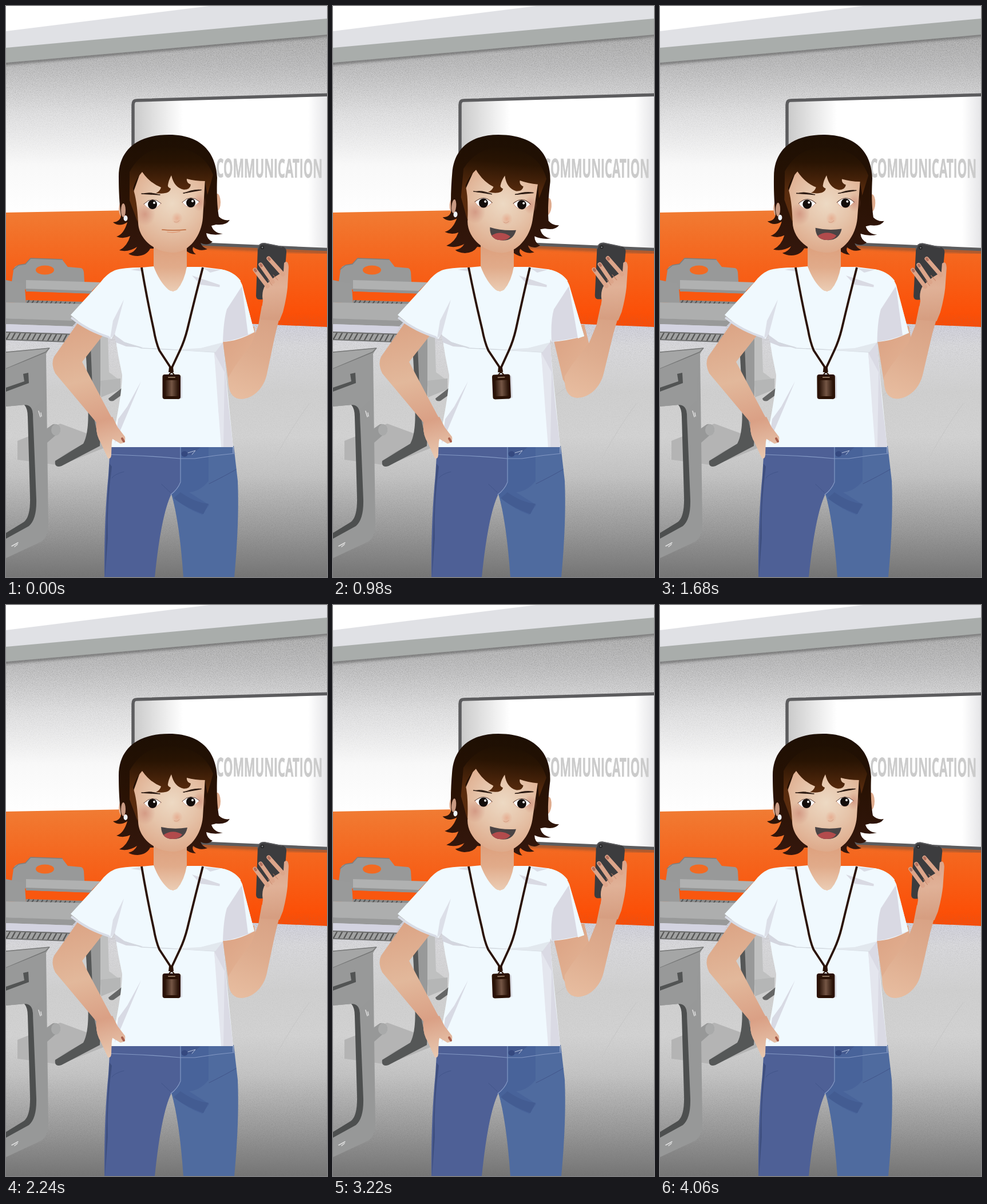
These frames come from a looping animation (561 px wide and 998 px high, 4.2 s). An HTML page:

```html
<!DOCTYPE html>
<html lang="en">
<head>
<meta charset="utf-8">
<title>Classroom</title>
<style>
html, body { margin: 0; width: 100%; height: 100%; overflow: hidden; background: #fff; }
svg { position: absolute; left: 0; top: 0; width: 561px; height: 998px; }
#room { will-change: transform; }
</style>
</head>
<body>
<svg id="room" viewBox="0 0 561 998">
  <defs>
    <linearGradient id="wall" x2="0" y2="1">
      <stop offset="0" stop-color="#b2b2b2"/><stop offset=".2" stop-color="#c2c2c3"/>
      <stop offset=".45" stop-color="#e2e2e3"/><stop offset=".72" stop-color="#f8f8f8"/><stop offset="1" stop-color="#fff"/>
    </linearGradient>
    <linearGradient id="orange" x2="0" y2="1">
      <stop offset="0" stop-color="#f07d35"/><stop offset=".45" stop-color="#f5651d"/><stop offset="1" stop-color="#fd4a02"/>
    </linearGradient>
    <linearGradient id="floor" x2="0" y2="1">
      <stop offset="0" stop-color="#d0d0df"/><stop offset=".13" stop-color="#dadadd"/><stop offset=".3" stop-color="#d0d0d0"/>
      <stop offset=".47" stop-color="#d3d3d3"/><stop offset=".62" stop-color="#c4c4c4"/><stop offset=".82" stop-color="#9c9c9c"/><stop offset="1" stop-color="#747474"/>
    </linearGradient>
    <linearGradient id="board">
      <stop offset="0" stop-color="#c9c9c9"/><stop offset=".1" stop-color="#dfdfdf"/><stop offset=".25" stop-color="#fff"/>
      <stop offset=".88" stop-color="#fff"/><stop offset="1" stop-color="#dedee1"/>
    </linearGradient>
    <linearGradient id="fade" x2="0" y2="1">
      <stop offset="0" stop-color="#fff"/><stop offset=".14" stop-color="#555"/><stop offset=".24" stop-color="#000"/>
      <stop offset=".51" stop-color="#000"/><stop offset=".53" stop-color="#888"/><stop offset=".63" stop-color="#222"/>
      <stop offset=".8" stop-color="#333"/><stop offset="1" stop-color="#fff"/>
    </linearGradient>
    <mask id="grainMask"><rect y="55" width="561" height="943" fill="url(#fade)"/></mask>
    <filter id="grain" x="0" y="0" width="1" height="1">
      <feTurbulence type="fractalNoise" baseFrequency=".8" numOctaves="2" seed="4"/>
      <feColorMatrix values="0 0 0 0 .2  0 0 0 0 .2  0 0 0 0 .2  1.5 0 0 0 -.63"/>
    </filter>
    <filter id="soft"><feGaussianBlur stdDeviation="2.5"/></filter>
  </defs>
  <path d="M0 90L561 40V360L0 368Z" fill="url(#wall)"/>
  <path d="M0 535L561 560V998H0Z" fill="url(#floor)"/>
  <path d="M0 361L220 357L561 350V561L440 556L0 537Z" fill="url(#orange)"/>
  <g mask="url(#grainMask)"><rect y="55" width="561" height="943" filter="url(#grain)"/></g>
  <path d="M-9 101L570 50" stroke="#444" stroke-width="4" filter="url(#soft)" opacity=".8"/>
  <path d="M0 0H561V50L0 99Z" fill="#a9adab"/>
  <path d="M0 0H561V22L0 73Z" fill="#e0e1e5"/>
  <path d="M0 0H355L0 44Z" fill="#fff"/>
  <path d="M226 415L575 431" stroke="#444" stroke-width="5" filter="url(#soft)" opacity=".6"/>
  <path d="M228 165L570 155V426L228 411Q222 411 222 404V173Q222 165 228 165Z" fill="url(#board)" stroke="#5c5c5e" stroke-width="5.5"/>
  <text transform="matrix(.46 .002 0 1 553 300)" font-family="'Open Sans','Noto Sans',sans-serif" font-weight="700" font-size="45" text-anchor="end" fill="#cbcbcb" stroke="#cbcbcb" stroke-width=".8">COMMUNICATION</text>
  <g id="desks"></g>
</svg>
<svg id="person" viewBox="0 0 561 998">
  <defs>
    <linearGradient id="hair" gradientUnits="userSpaceOnUse" x1="285" y1="225" x2="285" y2="436">
      <stop offset="0" stop-color="#1d0f03"/><stop offset=".5" stop-color="#291204"/><stop offset="1" stop-color="#34170d"/>
    </linearGradient>
    <linearGradient id="fringe" gradientUnits="userSpaceOnUse" x1="285" y1="245" x2="285" y2="326">
      <stop offset="0" stop-color="#1f1003"/><stop offset=".35" stop-color="#291403"/><stop offset="1" stop-color="#5a2c0e"/>
    </linearGradient>
    <radialGradient id="face" gradientUnits="userSpaceOnUse" cx="290" cy="345" r="92">
      <stop offset="0" stop-color="#edd9c3"/><stop offset=".45" stop-color="#e6c5ab"/><stop offset="1" stop-color="#dda686"/>
    </radialGradient>
    <linearGradient id="neck" x2="0" y2="1">
      <stop offset="0" stop-color="#dd9f7c"/><stop offset=".5" stop-color="#e1ab8a"/><stop offset="1" stop-color="#ebcdb5"/>
    </linearGradient>
    <linearGradient id="leftArm" gradientUnits="userSpaceOnUse" x1="120" y1="560" x2="180" y2="790">
      <stop offset="0" stop-color="#dca586"/><stop offset=".4" stop-color="#e2b89b"/><stop offset=".72" stop-color="#daa085"/><stop offset="1" stop-color="#e8c8b0"/>
    </linearGradient>
    <linearGradient id="upper" gradientUnits="userSpaceOnUse" x1="380" y1="590" x2="440" y2="660">
      <stop offset="0" stop-color="#dda586"/><stop offset="1" stop-color="#e3b698"/>
    </linearGradient>
    <linearGradient id="fore" gradientUnits="userSpaceOnUse" x1="470" y1="520" x2="415" y2="685">
      <stop offset="0" stop-color="#d69e81"/><stop offset=".55" stop-color="#deac8e"/><stop offset="1" stop-color="#e7bc9f"/>
    </linearGradient>
    <linearGradient id="palm" gradientUnits="userSpaceOnUse" x1="460" y1="440" x2="470" y2="545">
      <stop offset="0" stop-color="#dba085"/><stop offset=".5" stop-color="#e0b197"/><stop offset="1" stop-color="#d69e81"/>
    </linearGradient>
    <radialGradient id="blush"><stop offset="0" stop-color="#c98270" stop-opacity=".6"/><stop offset="1" stop-color="#c98270" stop-opacity="0"/></radialGradient>
    <radialGradient id="glow"><stop offset="0" stop-color="#e59a7c" stop-opacity=".6"/><stop offset="1" stop-color="#e59a7c" stop-opacity="0"/></radialGradient>
    <linearGradient id="badgeFill"><stop offset="0" stop-color="#2b150a"/><stop offset=".5" stop-color="#755645"/><stop offset="1" stop-color="#2b150a"/></linearGradient>
  </defs>
  <g id="backHair"></g>
  <g id="upperArm"></g>
  <g id="foreArm"><g id="limb"></g><g id="hand"></g></g>
  <g id="body"></g>
  <g id="sleeve"></g>
  <path id="strap" fill="none" stroke="#2a1206" stroke-width="3.8" stroke-linejoin="round"/>
  <g id="badge"></g>
  <path d="M258 415V455Q268 482 284 496Q291 501 299 496Q312 481 316 455V415Z" fill="url(#neck)"/>
  <g id="head"></g>
</svg>
<script>
const $ = id => document.getElementById(id);
const shape = (d, fill) => `<path d="${d}" fill="${fill}"/>`;
const line = (d, color, w = 1) => `<path d="${d}" fill="none" stroke="${color}" stroke-width="${w}" stroke-linecap="round" stroke-linejoin="round"/>`;
const oval = (x, y, rx, ry, fill) => `<ellipse cx="${x}" cy="${y}" rx="${rx}" ry="${ry}" fill="${fill}"/>`;
const fill = (id, ...parts) => $(id).innerHTML = parts.join('');
const slats = (x, y, n, gap, dx, dy) => Array.from({ length: n }, (_, i) =>
  line(`M${x + i * gap} ${y + i * .35}l${dx} ${dy}`, '#555', 2.2)).join('');

fill('desks',
  // back row
  shape('M10 482L13 462Q14 454 22 453L34 451L43 441L98 443L108 456L131 458Q135 459 136 465L138 498L35 496Z', '#989999'),
  line('M12 461L22 453L34 451L43 441L98 443', '#7d7e7e', 1.5),
  oval(68, 461.5, 16, 8, '#f26a22'),
  shape('M35 479L165 483L148 500L35 496Z', '#b0b1b1'),
  shape('M35 494L150 498V503L35 499Z', '#929393'),
  shape('M35 499L148 503L140 518L35 514Z', '#f9570f'),
  shape('M35 514L135 517L128 524L35 520Z', '#8a8b8b'),
  slats(40, 515, 11, 8, -4, 6),
  shape('M0 479L28 485Q33 486 33 492L35 520L0 518Z', '#999a9a'),
  // middle row
  shape('M165 570L178 575L180 640L200 655V662L165 664Z', '#bfc0c0'),
  shape('M165 655L200 651V670L166 684Z', '#b5b6b6'),
  shape('M179 686L202 668V680L188 690Q180 692 179 686Z', '#656666'),
  shape('M20 760L95 730L190 765L95 803L20 793Z', '#b4b4b4'),
  shape('M0 518L146 521L115 551L0 546Z', '#adaeae'),
  shape('M0 546L115 550L146 521V528L116 560L0 556Z', '#989999'),
  shape('M0 556L116 560L110 574L0 569Z', '#d3d3e0'),
  shape('M0 569L118 573L108 586L0 583Z', '#a1a2a2'),
  slats(7, 571, 12, 9, -6, 11),
  line('M0 570L118 574M0 583L108 587', '#6e6f6f', 2),
  shape('M140 600L165 572L165 752L100 785L92 789L140 763Q151 740 149 690Z', '#989999'),
  shape('M138 600L148 595L152 690Q153 738 165 752L164 769L97 804Q84 808 86 795L135 765Q146 745 143 695Z', '#555757'),
  shape('M92 610L139 595L145 705L90 650Z', '#cfd0d0'),
  shape('M45 757L82 731Q95 729 95 743L70 765L45 785Z', '#979898'),
  oval(87, 741, 8, 10, '#a9aaaa'),
  // front desk
  shape('M0 605L76 598L70 608L74 905Q74 930 60 937L0 965V930L40 907Q52 896 51 862L47 714Q46 698 33 697L0 700Z', '#979898'),
  shape('M0 605L76 598L69 605L0 634Z', '#a5a6a6'),
  line('M0 634L69 605L76 598L0 605', '#757676', 1.4),
  shape('M0 634L68 607L64 690L48 705L34 697L0 700Z', '#989999'),
  shape('M30 643L39 641L40 659L0 674V667L32 656Z', '#525454'),
  shape('M32 697Q46 697 47 713L53 862Q54 897 40 909L0 931V921L31 902Q43 893 42 858L38 718Q38 704 32 697Z', '#4d4f4f'),
  line('M57 708l3 10M61 711l1 6M10 944l11-6M15 945l5-4', '#e0e0e0', 1.5),
  line('M470 790Q500 735 530 695M390 680L410 665', '#c5c5c5', 1)
);

const outline = 'M197 300C196 250 232 225 285 225C333 225 366 248 369 300C368 330 369 350 372 368Q380 376 391 374Q385 384 367 382Q359 384 359 384C362 394 371 398 379 398Q365 402 350 397Q351 408 361 412Q352 420 340 414Q343 422 352 425Q338 430 327 421Q324 428 332 434Q320 434 310 424L252 424Q246 436 230 437Q220 437 214 433Q225 430 229 421Q214 431 198 427Q212 420 217 402Q205 408 193 403Q206 399 212 378Q198 387 187 378Q200 377 201 366C198 345 197 320 197 300Z';
fill('backHair',
  oval(205, 355, 8, 15, '#dfae94'), oval(369, 343, 6, 15, '#dfab8d'),
  shape(outline, 'url(#hair)'),
  oval(205, 357, 4, 12, '#c99a83'), oval(209, 371, 3.5, 5, '#eef3fa'));

fill('upperArm', shape('M378 560L379 588L388 652Q400 684 432 666L440 600L434 560Z', 'url(#upper)'));
fill('limb', shape('M447 524L441 558L429 590L400 630L388 650C388 672 394 687 412 687C432 686 451 668 456 643L471 572L482 530Z', 'url(#fore)'));
const finger = (a, b) => line(`M${a}L${b}`, '#dca58a', 7.2) + line(`M${a}l1.5 2`, '#b3705e', 4.5);
fill('hand',
  shape('M440 423Q442 413 452 414L482 420Q491 422 490 431L484 505Q483 512 475 512L443 513Q437 513 437 506Z', '#3c3c3e'),
  line('M440 425Q442 415 451 415L482 421', '#5d5d60', 1.5),
  oval(448, 422, 3, 3, '#222'), oval(448, 422, 1.4, 1.4, '#76777c'),
  shape('M453 488L469 474L485 464L486 449Q493 443 494 456L492 492Q490 512 484 535L478 550L444 548L449 515Q446 500 453 488Z', 'url(#palm)'),
  finger('435 461', '457 490'), finger('445 452', '466 482'), finger('459 441', '484 469'),
  line('M458 479L465 488M467 470L475 479', '#c78468', 1));

fill('body',
  // resting arm
  shape('M126 553L84 613Q78 625 86 642L158 728Q156 748 166 764L178 790Q183 794 183 782L190 740L186 722L133 622L170 575Z', 'url(#leftArm)'),
  // jeans
  shape('M182 769H310L306 840L289 853Q271 890 260 998H172Q171 900 179 820Z', '#4e6096'),
  shape('M304 769H398L405 830Q408 900 399 998H310Q303 900 289 853L304 838Z', '#4f6b9f'),
  shape('M304 771H354V830Q340 848 320 850L355 872L343 889Q318 880 296 862L289 853L304 838Z', '#48639a'),
  shape('M181 800Q175 880 173 998L178 930Q176 870 185 805Z', '#3e4f80'),
  shape('M305 850Q330 868 354 870L345 888Q310 875 293 860Z', '#435c92'),
  shape('M306 771H340L324 785L306 783Z', '#43598f'),
  line('M184 784Q250 786 304 791H330Q365 785 400 782M305 771V832Q300 845 288 854', '#8398c4', 1.2),
  line('M397 771V781M318 781L331 777L325 784', '#b8c5e0', 1),
  line('M185 825Q190 818 206 814M272 836L287 850M355 835Q385 820 402 810', '#42558a', 1),
  oval(312, 783, 5.5, 5, '#354980'),
  // shirt
  shape('M237 457Q205 457 190 462Q176 468 165 483L113 540Q145 568 184 582L190 572L196 610L203 645Q203 680 183 771H397L379 590L385 540L410 480Q398 464 375 460L343 456H316L292 499L258 455Z', '#f0f9fe'),
  shape('M379 588L364 606Q372 690 371 705L380 771H397L388 690Z', '#dadae4'),
  shape('M382 640L364 606L371 705L376 771H380Z', '#e4e6ee'),
  shape('M190 765L236 656L212 700L196 722Z', '#d8dae4'),
  shape('M190 575L208 588L240 597L210 595L192 588Z', '#d4d6df'),
  shape('M187 550L206 513L190 574L182 581Z', '#dcdfe8'),
  shape('M115 543Q145 566 180 577L184 582Q142 570 113 546Z', '#d8dce6'),
  line('M207 588L237 598L300 601L366 605', '#d2d8df', 1.4),
  shape('M285 601L340 598L379 588L366 605Z', '#e2e8ee'),
  shape('M218 461L240 457L238 464Z', '#d9dce5'),
  shape('M345 458L375 461L357 466Z', '#d9dce5'),
  shape('M325 471L393 494L340 487Z', '#d9dae3'),
  // hand on hip
  shape('M158 728L186 718L195 736L208 753Q210 764 200 765L185 756L184 785Q183 793 178 790L166 764Q156 748 158 728Z', 'url(#leftArm)'),
  line('M203 756L206 761', '#a9604c', 4));

fill('badge',
  shape('M282 642L303 645Q308 646 308 651V685L300 688Z', '#d9dce4'),
  shape('M285 631H292L293 640H284Z', '#2a1206'),
  line('M285 645Q289 636 294 645', '#2a1206', 2),
  '<rect x="273.5" y="644" width="31.5" height="43" rx="4" fill="#2a1206"/>',
  '<rect x="278" y="654" width="23" height="28" rx="2" fill="url(#badgeFill)"/>',
  line('M284 649H295', '#8c735f', 2));

const eye = (x, y) =>
  shape(`M${x - 15} ${y}Q${x} ${y - 15} ${x + 15} ${y - 1}Q${x + 6} ${y + 9} ${x} ${y + 9}Q${x - 9} ${y + 9} ${x - 15} ${y}Z`, '#fff') +
  line(`M${x - 15} ${y}Q${x - 9} ${y + 9} ${x} ${y + 9}Q${x + 6} ${y + 9} ${x + 15} ${y - 1}`, '#d9a48e', 1) +
  line(`M${x - 15} ${y}Q${x} ${y - 15} ${x + 15} ${y - 1}`, '#5b3a2e', 1) +
  oval(x, y + 1, 8, 8, '#130d0b') + oval(x + 3, y - 2, 2, 2, '#fff');
fill('head',
  shape('M221 330L237 285H349L344 370C342 400 321 431 292 431C258 431 231 405 231 378Z', 'url(#face)'),
  oval(243, 364, 18, 20, 'url(#blush)'), oval(338, 343, 12, 16, 'url(#blush)'),
  oval(299, 371, 10, 11, 'url(#glow)'),
  line('M294 377Q299 380 303 375', '#d49b80', 1),
  eye(256, 346), eye(323, 343),
  shape('M236 329Q250 323 270 330Q251 328 236 329Z', '#2d1b12'),
  shape('M309 328Q326 319 343 321Q326 324 309 328Z', '#2d1b12'),
  line('M237 328L269 330M310 327L341 321.5', '#2d1b12', 1.4),
  `<g id="closed">${line('M273 391Q292 393 314 391', '#bd6639', 1.7)}${line('M282 395Q293 397 304 394', '#e0936e', 1.2)}</g>`,
  `<g id="open">${shape('M271 388Q293 393 317 389Q313 410 291 409Q272 409 271 388Z', '#4a4445')}${shape('M275 402Q291 391 308 401Q303 409 291 409Q280 409 275 402Z', '#b24b4c')}</g>`,
  shape('M231 380L216 340L216 290Q240 245 290 247Q345 250 362 295L352 330L348 306Q330 306 316 302Q315 309 323 312Q322 321 311 321Q294 318 289 296Q284 305 283 313Q282 317 288 319Q286 330 262 327Q269 324 271 317Q252 310 238 290Q226 303 222 319Q229 338 231 380Z', 'url(#fringe)'));

// step, head tilt, upper arm swing, forearm turn, hand turn, badge offset
const poses = [
  [0, 0, 0, 0, 0, 0], [3, 4.2, 1, .2, -4, 4.5], [5, 5.1, 1, 1.2, -2, 3.4], [8, 5, 1, 2, -1, 4],
  [10, 3.6, .7, 2.5, -1.5, 2], [13, 0, 0, .8, 0, .3], [14, 0, 0, 0, 0, 0], [16, 0, 0, 0, 0, 0],
  [19, 4.4, 1, .2, -4, 4.5], [20, 5.1, 1, 1, -2, 3], [26, 4.8, 1, 2, -1, 4], [29, 0, 0, .8, 0, .3], [30, 0, 0, 0, 0, 0]
];
const quiet = [0, 4, 5, 9, 10, 14, 15, 19, 20, 24, 25];
const STEP = 140, COUNT = 30;

function poseAt(step) {
  const i = poses.findIndex(p => p[0] > step), a = poses[i - 1], b = poses[i];
  const u = (step - a[0]) / (b[0] - a[0]), e = u * u * (3 - 2 * u);
  return a.map((v, j) => v + (b[j] - v) * e);
}

function draw(step) {
  const [, tilt, swing, fore, hand, shift] = poseAt(step);
  const move = (id, t) => $(id).setAttribute('transform', t);
  for (const id of ['head', 'backHair']) move(id, `rotate(${tilt} 288 425)`);
  move('upperArm', `rotate(${-5.2 * swing} 400 500)`);
  move('foreArm', `translate(${16.5 * swing} ${-2 * swing}) rotate(${fore} 413 660)`);
  move('hand', `rotate(${hand} 466 532)`);
  move('badge', `translate(${shift} 0) rotate(${-.6 * shift} 289 632)`);
  const side = (x, y, k) => `${x + shift * k} ${y}`;
  $('strap').setAttribute('d', `M237 457Q${side(247, 515, .4)} ${side(258, 565, .7)}Q${side(262, 588, .8)} ${side(268, 602, .9)}L${side(289, 634, 1)}L${side(304, 602, .9)}Q${side(312, 585, .8)} ${side(317, 565, .7)}Q${side(329, 515, .4)} 344 457`);
  const tip = `${434 + 5 * swing} ${570 + 7 * swing}`, pit = `${379 + 3 * swing} 587`;
  fill('sleeve',
    shape(`M375 460Q404 465 413 488L${tip}Q405 586 ${pit}L370 560Z`, '#f0f9fe'),
    shape(`M412 490L386 530Q380 550 ${pit}Q405 584 ${tip}Z`, '#d9d9e3'),
    shape(`M412 487L${tip}L${423 + 5 * swing} ${574 + 7 * swing}Z`, '#f0f9fe'));
  const shut = quiet.includes(step);
  $('closed').style.display = shut ? '' : 'none';
  $('open').style.display = shut ? 'none' : '';
}

let last = -1;
const start = performance.now();
function tick(now) {
  const step = Math.floor(Math.max(0, now - start) / STEP) % COUNT;
  if (step !== last) draw(last = step);
  requestAnimationFrame(tick);
}
draw(0);
requestAnimationFrame(tick);
</script>
</body>
</html>
```
